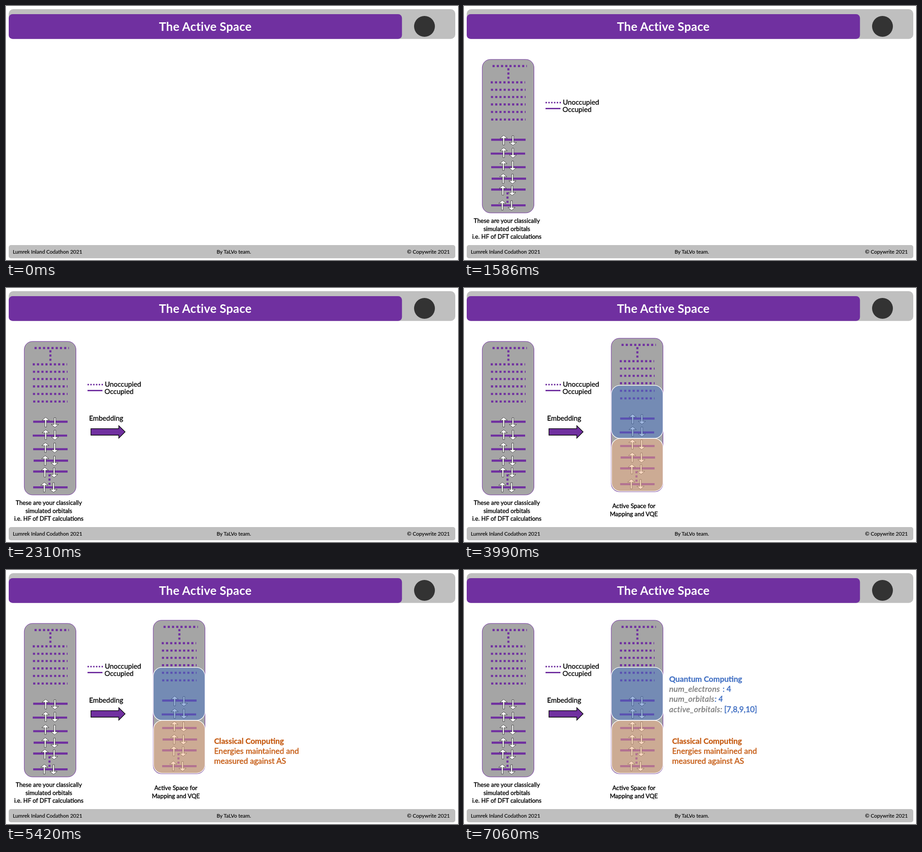
These frames come from a looping animation (998x561 px, 8000 ms). An HTML page:

```html
<!DOCTYPE html>
<html lang="en">
<head>
<meta charset="utf-8">
<title>The Active Space</title>
<style>
html, body { margin: 0; width: 100%; height: 100%; overflow: hidden; background: #fff; }
svg { display: block; width: 100%; height: 100%; }
text { font-family: Lato, "Open Sans", sans-serif; fill: #000; white-space: pre; }
.bar { fill: #bfbfbf; }
.purple { fill: #7030a0; }
.title { font-size: 26.4px; font-weight: 700; letter-spacing: .25px; fill: #fff; text-anchor: middle; }
.foot { font-size: 11.5px; stroke: #000; stroke-width: .15px; }
.note { font-size: 13.3px; stroke: #000; stroke-width: .4px; text-anchor: middle; }
.label { font-size: 15.3px; stroke: #000; stroke-width: .35px; }
.body { font-size: 17.5px; }
.body text { stroke-width: .45px; }
.body .head { font-size: 17.2px; font-weight: 700; stroke-width: .3px; }
.orange text { fill: #c55a11; stroke: #c55a11; }
.blue text, .blue .val { fill: #4472c4; stroke: #4472c4; font-style: normal; letter-spacing: 0; }
.blue .key { font-size: 17.8px; fill: #7f7f7f; stroke: #7f7f7f; font-style: italic; letter-spacing: .35px; }
.blue .val { font-size: 17.3px; stroke-width: .6px; }
.blue .slant { font-style: italic; }
.mid { text-anchor: middle; }
.end { text-anchor: end; }
.line { fill: none; stroke: #7030a0; stroke-width: 4.6; }
.dots { stroke-dasharray: 4.67; }
.thin { stroke-width: 3.1; }
.thin.dots { stroke-dasharray: 3.1; }
.zone { stroke: #fff; stroke-width: 1.3; fill-opacity: .5; }

.step { opacity: 0; animation: 8s step-end infinite; }
.orbitals { animation-name: orbitals; }
.embed { animation-name: embed; }
.space { animation-name: space; }
.orange { animation-name: classical; }
.blue { animation-name: quantum; }
@keyframes orbitals { 0% { opacity: 0 } 6.25%, 100% { opacity: 1 } }
@keyframes embed { 0% { opacity: 0 } 28.875%, 100% { opacity: 1 } }
@keyframes space { 0% { opacity: 0 } 49.875%, 100% { opacity: 1 } }
@keyframes classical { 0% { opacity: 0 } 67.75%, 100% { opacity: 1 } }
@keyframes quantum { 0% { opacity: 0 } 88.25%, 100% { opacity: 1 } }
</style>
</head>
<body>
<svg viewBox="0 0 998 561" preserveAspectRatio="none">
  <defs>
    <path id="up" d="M0 0L8 6.6H1.7V21.5H-1.7V6.6H-8Z" fill="#fff" stroke="#222" stroke-width=".8"/>
    <g id="pair">
      <use href="#up"/>
      <use href="#up" transform="translate(20.4 22.3) scale(1 -1)"/>
    </g>
    <g id="panel">
      <rect x="40.3" y="118" width="114.2" height="339" rx="18" fill="#a5a5a5" stroke="#7030a0"/>
      <path class="line dots" d="M63 132.6H139M59 168.6H135M59.5 185H136M59.5 201H136M59.5 217.4H136M59.5 234H136M60 250.8H136M98 137.5V161M96 411.5V435.5"/>
      <path class="line" d="M60 295.4H136M59 326H135M60 356H136M61 381.4H137M60 405.4H136M60 440.2H136"/>
      <use href="#pair" x="87.6" y="285.6"/>
      <use href="#pair" x="87.6" y="313.2"/>
      <use href="#pair" x="87" y="341.6"/>
      <use href="#pair" x="86.6" y="370.4"/>
      <use href="#pair" x="85.8" y="396.2"/>
      <use href="#pair" x="84.6" y="429.2"/>
    </g>
  </defs>

  <rect class="bar" x="6" y="7" width="986" height="65.7" rx="10"/>
  <rect class="purple" x="6" y="18" width="868.3" height="54.7" rx="8.5"/>
  <text class="title" x="440" y="54.8">The Active Space</text>
  <circle cx="924" cy="45" r="23" fill="#333"/>

  <rect class="bar" x="6" y="528" width="986" height="29.3" rx="5"/>
  <text class="foot" x="15" y="546.6">Lumrek Inland Codathon 2021</text>
  <text class="foot mid" x="503" y="546.6">By TaLVo team.</text>
  <text class="foot end" x="980" y="546.6">© Copywrite 2021</text>

  <g class="step orbitals">
    <use href="#panel"/>
    <text class="note" x="94.5" y="479.2">These are your classically</text>
    <text class="note" x="94.5" y="496.8">simulated orbitals</text>
    <text class="note" x="94.5" y="514">i.e. HF of DFT calculations</text>
    <path class="line thin dots" d="M180 213.4H214"/>
    <path class="line thin" d="M180 226.5H213"/>
    <text class="label" x="218.2" y="218.4">Unoccupied</text>
    <text class="label" x="217.6" y="233.8">Occupied</text>
  </g>

  <g class="step embed">
    <text class="label" x="183.5" y="293">Embedding</text>
    <path class="purple" d="M187.5 310.6H249V304L263 317.8L249 331.6V325H187.5Z" stroke="#000" stroke-width="1.3"/>
  </g>

  <g class="step space">
    <use href="#panel" x="284.8" y="-7"/>
    <rect class="zone" x="325.2" y="215.2" width="114.2" height="116.8" rx="19" fill="#4472c4"/>
    <rect class="zone" x="325.8" y="332.4" width="113.6" height="116.4" rx="19" fill="#f4b183"/>
    <text class="note" x="375" y="486.2">Active Space for</text>
    <text class="note" x="375" y="503.8">Mapping and VQE</text>
  </g>

  <g class="step body orange">
    <text class="head" x="459.5" y="383.6">Classical Computing</text>
    <text x="459.5" y="406">Energies maintained and</text>
    <text x="459.5" y="428.2">measured against AS</text>
  </g>

  <g class="step body blue">
    <text class="head" x="453" y="246.8">Quantum Computing</text>
    <text class="key" x="453" y="269">num_electrons<tspan class="val" x="571">: 4</tspan></text>
    <text class="key" x="453" y="291.4">num_orbitals<tspan class="val slant" x="553.5">: 4</tspan></text>
    <text class="key" x="453" y="313.8">active_orbitals:<tspan class="val" x="574.5">[7,8,9,10]</tspan></text>
  </g>
</svg>
</body>
</html>
```
